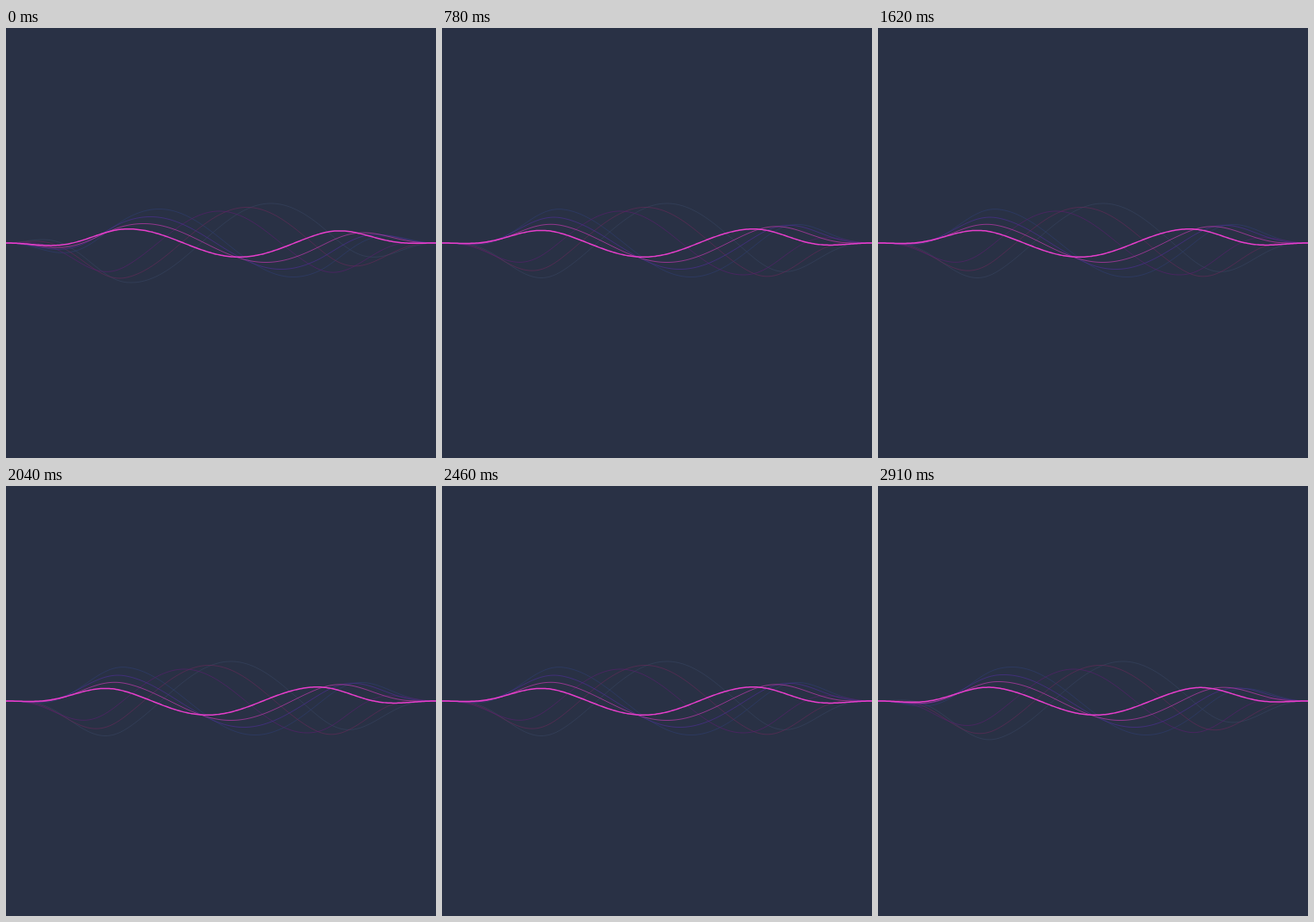
An HTML page with a canvas for the animation above (2.94 s loop, 500x500 px).

```html
<!DOCTYPE html>
<html>
<head>
<meta charset="utf-8">
<style>
  html, body { margin: 0; width: 100%; height: 100%; overflow: hidden; background: #293145; }
  canvas { display: block; }
</style>
</head>
<body>
<canvas id="stage" width="500" height="500"></canvas>
<script>
const ctx = document.getElementById('stage').getContext('2d');
const SIZE = 500, MID = 250, STEP = 30, STEPS = 14, EDGE = 140;

// amp: signed height at the anchor (positive is down), anchor: x of the middle extremum at time 0
const waves = [
  { amp: -46,   anchor: 308, length: 325, color: 'rgba(58,72,102,0.5)' },
  { amp: 39.5,  anchor: 334, length: 312, color: 'rgba(48,62,112,0.6)' },
  { amp: -41.5, anchor: 280, length: 305, color: 'rgba(112,40,92,0.55)' },
  { amp: -37,   anchor: 248, length: 286, color: 'rgba(92,30,112,0.6)' },
  { amp: 30.5,  anchor: 320, length: 304, color: 'rgba(78,46,148,0.65)' },
  { amp: 22.5,  anchor: 302, length: 284, color: 'rgba(190,58,172,0.7)' },
  { amp: 16.3,  anchor: 271, length: 258, color: '#e63ecb', width: 1.5 }
];

// Flat in the middle, eased to zero at both ends
function envelope(x) {
  const d = Math.min(x, SIZE - x, EDGE);
  return Math.sin(Math.PI * d / (2 * EDGE)) ** 2;
}

function drawWave({ amp, anchor, length, color, width = 1 }, turn) {
  ctx.beginPath();
  for (let x = 0; x <= SIZE; x += 2) {
    const phase = 2 * Math.PI * ((x - anchor) / length - turn);
    ctx.lineTo(x, MID + amp * envelope(x) * Math.cos(phase));
  }
  ctx.strokeStyle = color;
  ctx.lineWidth = width;
  ctx.stroke();
}

const start = performance.now();
function draw(now) {
  const step = Math.floor(Math.max(0, now - start) / STEP) % STEPS;
  ctx.fillStyle = '#293145';
  ctx.fillRect(0, 0, SIZE, SIZE);
  for (const wave of waves) drawWave(wave, step / STEPS);
  requestAnimationFrame(draw);
}
draw(start);
</script>
</body>
</html>
```
